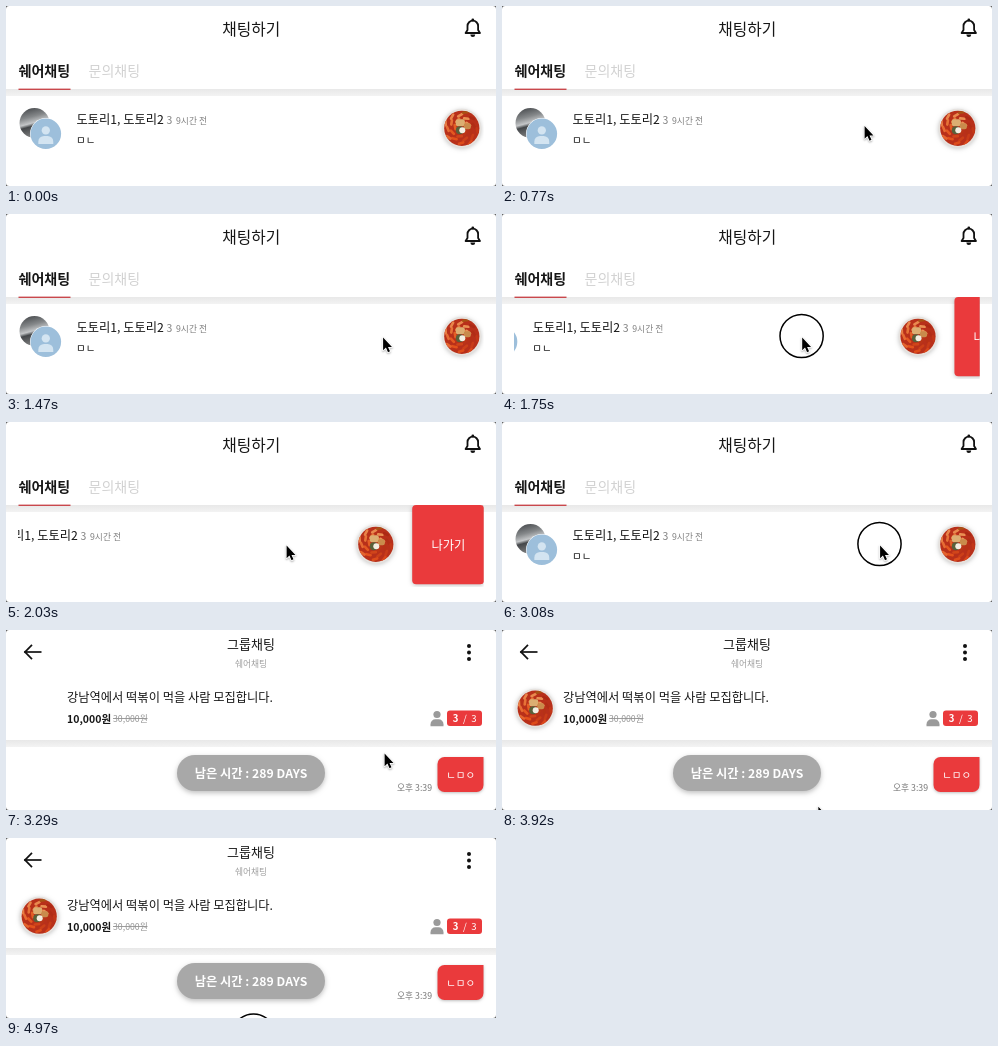
Animation of 490x180 px, one loop 5.04 s. Source, as an HTML page with a canvas:

```html
<!DOCTYPE html>
<html lang="ko">
<head>
<meta charset="utf-8">
<title>채팅하기</title>
<style>
html, body { margin: 0; width: 100%; height: 100%; overflow: hidden; background: #fff; }
canvas { display: block; width: 490px; height: 180px; }
</style>
</head>
<body>
<canvas id="stage" width="490" height="180"></canvas>
<script>
const ctx = document.getElementById('stage').getContext('2d');
const W = 490, H = 180, LOOP = 5040, STEP = 70;
const RED = '#ea3a3c', INK = '#161616';
const FONT = '"Noto Sans CJK KR", "Noto Sans KR", "Noto Sans CJK", sans-serif';

// Times of the gestures
const TAP = 840, SWIPE_OPEN = 1540, SWIPE_CLOSE = 2660, DRAG = 420;
const LEAVE_LIST = 3150, ENTER_CHAT = 3290, LAST_TAP = 4970;

const smooth = p => p * p * (3 - 2 * p);
const easeOut = p => 1 - (1 - p) ** 2.3;
const linear = p => p;

// Progress from 0 to 1 of a move that begins at a given time
function glide(t, begin, span, curve) {
  return curve(Math.min(1, Math.max(0, (t - begin) / span)));
}

const bend = (a, b, c, p) => a * (1 - p) ** 2 + 2 * b * p * (1 - p) + c * p * p;

// The row lags a little behind the pointer.
function rowShift(t) {
  const lag = 20;
  return 86 * (glide(t, SWIPE_CLOSE + lag, DRAG - lag, smooth) - glide(t, SWIPE_OPEN + lag, DRAG - lag, smooth));
}

function pointerAt(t) {
  if (t < TAP) {
    const p = glide(t, 140, 630, smooth);
    return [bend(254, 318, 362, p), bend(184, 84, 118.5, p)];
  }
  if (t >= ENTER_CHAT) {
    const p = glide(t, ENTER_CHAT, 770, linear);
    return [bend(378, 360, 293, p), bend(122, 177, 177, p)];
  }
  const approach = glide(t, 1190, 280, smooth);
  const x = 362 + 14.5 * approach
    - 96.5 * glide(t, SWIPE_OPEN, DRAG, easeOut)
    - 18 * glide(t, 2240, 210, smooth)
    + 115.5 * glide(t, SWIPE_CLOSE, DRAG, easeOut);
  return [x, 118.5 + 3.5 * approach];
}

const during = (t, from, to) => t >= from && t < to;
const pressed = t => during(t, TAP, TAP + 140) || during(t, SWIPE_OPEN, 2030) || during(t, 2520, LEAVE_LIST);

function text(str, x, y, size, color = INK, weight = 400, align = 'left') {
  ctx.font = `${weight} ${size}px ${FONT}`;
  ctx.fillStyle = color;
  ctx.textAlign = align;
  ctx.fillText(str, x, y);
}

function disc(x, y, r, color) {
  ctx.fillStyle = color;
  ctx.beginPath();
  ctx.arc(x, y, r, 0, Math.PI * 2);
  ctx.fill();
}

function box(x, y, w, h, r, color) {
  ctx.fillStyle = color;
  ctx.beginPath();
  ctx.roundRect(x, y, w, h, r);
  ctx.fill();
}

function line(x1, y1, x2, y2, width, color = '#111') {
  ctx.strokeStyle = color;
  ctx.lineWidth = width;
  ctx.beginPath();
  ctx.moveTo(x1, y1);
  ctx.lineTo(x2, y2);
  ctx.stroke();
}

function withShadow(alpha, blur, dy, draw) {
  ctx.save();
  ctx.shadowColor = `rgba(0,0,0,${alpha})`;
  ctx.shadowBlur = blur;
  ctx.shadowOffsetY = dy;
  draw();
  ctx.restore();
}

function clipped(path, draw) {
  ctx.save();
  ctx.beginPath();
  path();
  ctx.clip();
  draw();
  ctx.restore();
}

function band(y) {
  const g = ctx.createLinearGradient(0, y, 0, y + 7);
  g.addColorStop(0, '#e8e8e8');
  g.addColorStop(1, '#f3f3f3');
  ctx.fillStyle = g;
  ctx.fillRect(0, y, W, 7);
}

function person(x, y, s, color) {
  disc(x, y - 4 * s, 3.6 * s, color);
  box(x - 6.5 * s, y + 0.8 * s, 13 * s, 7 * s, [5 * s, 5 * s, 0, 0], color);
}

function bell(x, y) {
  ctx.save();
  ctx.translate(x, y);
  ctx.strokeStyle = '#111';
  ctx.lineWidth = 1.8;
  ctx.lineJoin = 'round';
  ctx.beginPath();
  ctx.moveTo(-7.2, 7);
  ctx.lineTo(-5.3, 4);
  ctx.arc(0, 0, 5.3, Math.PI, 0);
  ctx.lineTo(5.3, 4);
  ctx.lineTo(7.2, 7);
  ctx.closePath();
  ctx.stroke();
  disc(0, -6, 1.4, '#111');
  clipped(() => ctx.rect(-3, 8.5, 6, 4), () => disc(0, 8.7, 2.4, '#111'));
  ctx.restore();
}

function avatars() {
  clipped(() => ctx.arc(28, 117, 15, 0, 7), () => {
    const g = ctx.createLinearGradient(22, 102, 30, 132);
    g.addColorStop(0, '#4a4d50');
    g.addColorStop(0.3, '#85888a');
    g.addColorStop(0.5, '#c4c6c8');
    g.addColorStop(0.6, '#44474a');
    g.addColorStop(1, '#8b8b8b');
    ctx.fillStyle = g;
    ctx.fillRect(12, 101, 32, 32);
  });
  disc(39.3, 127.8, 15.8, '#fff');
  disc(39.3, 127.8, 15.3, '#9dbfdb');
  clipped(() => ctx.arc(39.3, 127.8, 15.3, 0, 7), () => person(39.3, 129, 1.15, '#d3e4f1'));
}

function stew(x, y) {
  withShadow(0.22, 4, 1, () => disc(x, y, 19.5, '#e6e2de'));
  disc(x, y, 17.6, '#b8301a');
  clipped(() => ctx.arc(x, y, 17.6, 0, 7), () => {
    ctx.lineCap = 'round';
    for (let i = 0; i < 26; i++) {
      const a = i * 2.4, r = 3.4 * Math.sqrt(i);
      const px = x + Math.cos(a) * r, py = y + Math.sin(a) * r;
      const dx = Math.cos(a + 1.2) * 2.2, dy = Math.sin(a + 1.2) * 2.2;
      line(px - dx, py - dy, px + dx, py + dy, 2.6, `hsl(${8 + i * 7 % 18} 78% ${36 + i * 11 % 28}%)`);
    }
    ctx.lineCap = 'butt';
    box(x - 6, y - 9, 9, 7, 2, '#dcae72');
    box(x + 2, y - 5, 7, 6, 2, '#c98b4c');
    disc(x - 2, y + 2, 4, '#59613a');
    disc(x + 0.5, y + 2, 3, '#f3eee2');
  });
}

function row(shift) {
  clipped(() => ctx.rect(12, 83, 465.7, 82), () => {
    ctx.translate(shift + 0.5, 0);
    avatars();
    text('도토리1, 도토리2', 70, 118.2, 12.25);
    text('3', 160, 118.2, 10.5, '#808080');
    text('9시간 전', 169.5, 117.5, 8.75, '#808080', 500);
    text('ㅁㄴ', 69.5, 137.7, 10.5, INK, 500);
    stew(455.3, 122.3);
    if (shift < 0) {
      withShadow(0.25, 4, 1, () => box(491.7, 83, 72, 79.3, 4, RED));
      text('나가기', 527.8, 127.8, 12.25, '#fff', 500, 'center');
    }
  });
}

function listPage(t) {
  text('채팅하기', 245.2, 29, 15.75, INK, 400, 'center');
  bell(466.8, 20);
  text('쉐어채팅', 12.5, 70.2, 14, INK, 700);
  text('문의채팅', 82.5, 70.2, 14, '#d2d2d2', 500);
  band(83);
  ctx.fillStyle = '#c9484c';
  ctx.fillRect(12.5, 82.6, 52, 1.4);
  row(rowShift(t));
}

function chatPage(t) {
  line(19, 22, 35.5, 22, 1.7);
  line(18.4, 22.6, 26, 14.8, 1.7);
  line(18.4, 21.4, 26, 29.2, 1.7);
  text('그룹채팅', 245, 19.3, 13, INK, 400, 'center');
  text('쉐어채팅', 245, 36.5, 8.75, '#a0a0a0', 500, 'center');
  for (let i = -1; i <= 1; i++) disc(463, 22.5 + 6.5 * i, 2, '#111');

  if (t > ENTER_CHAT) stew(33.2, 78.2);
  text('강남역에서 떡볶이 먹을 사람 모집합니다.', 61, 71.5, 12.25);
  text('10,000원', 61, 92.5, 10.5, INK, 700);
  text('30,000원', 107, 92, 8.75, '#949494');
  line(107, 88.5, 141.5, 88.5, 0.9, '#949494');
  person(431, 88.5, 1, '#9a9a9a');
  box(441, 80.5, 35, 15.5, 3, RED);
  text('3', 449.5, 92, 9.6, '#fff', 700, 'center');
  text('/', 459, 92, 9.6, '#fff', 400, 'center');
  text('3', 468, 92, 9.6, '#fff', 400, 'center');
  band(110);

  withShadow(0.25, 5, 2, () => box(171, 125, 148, 36, 18, '#a8a8a8'));
  text('남은 시간 : 289 DAYS', 245, 147.5, 12.25, '#fff', 700, 'center');
  text('오후 3:39', 391, 161, 8.75, '#777', 500);
  withShadow(0.25, 3, 1, () => box(431.5, 127, 46, 35, [7, 0, 7, 7], RED));
  text('ㄴㅁㅇ', 454.7, 148.8, 10.5, '#fff', 500, 'center');
}

function ring(x, y) {
  ctx.strokeStyle = '#000';
  ctx.lineWidth = 1.5;
  ctx.beginPath();
  ctx.arc(x, y, 21.6, 0, Math.PI * 2);
  ctx.stroke();
}

function pointer(x, y) {
  const arrow = new Path2D('M0 0V14.6L3.3 11.6 5.7 17 8 16 5.7 10.8H10.3Z');
  ctx.save();
  ctx.translate(x + 0.6, y + 1.6);
  ctx.scale(0.86, 0.86);
  ctx.lineJoin = 'round';
  ctx.strokeStyle = '#fff';
  ctx.lineWidth = 2;
  withShadow(0.3, 2, 1, () => ctx.stroke(arrow));
  ctx.fillStyle = '#000';
  ctx.fill(arrow);
  ctx.restore();
}

function corners() {
  ctx.fillStyle = '#555';
  ctx.beginPath();
  ctx.rect(0, 0, W, H);
  ctx.roundRect(0, 0, W, H, 3);
  ctx.fill('evenodd');
}

function draw(t) {
  ctx.fillStyle = '#fff';
  ctx.fillRect(0, 0, W, H);
  if (!during(t, LEAVE_LIST, ENTER_CHAT)) {
    if (t < LEAVE_LIST) listPage(t);
    else chatPage(t);
    corners();
  }
  const [x, y] = pointerAt(t);
  if (pressed(t)) ring(x, y);
  if (during(t, 280, 4130)) pointer(x, y);
  if (t >= LAST_TAP) ring(247.5, 197.5);
}

const start = performance.now();
function tick() {
  const t = (performance.now() - start) % LOOP;
  draw(Math.floor(t / STEP) * STEP);
  requestAnimationFrame(tick);
}
tick();
</script>
</body>
</html>
```
